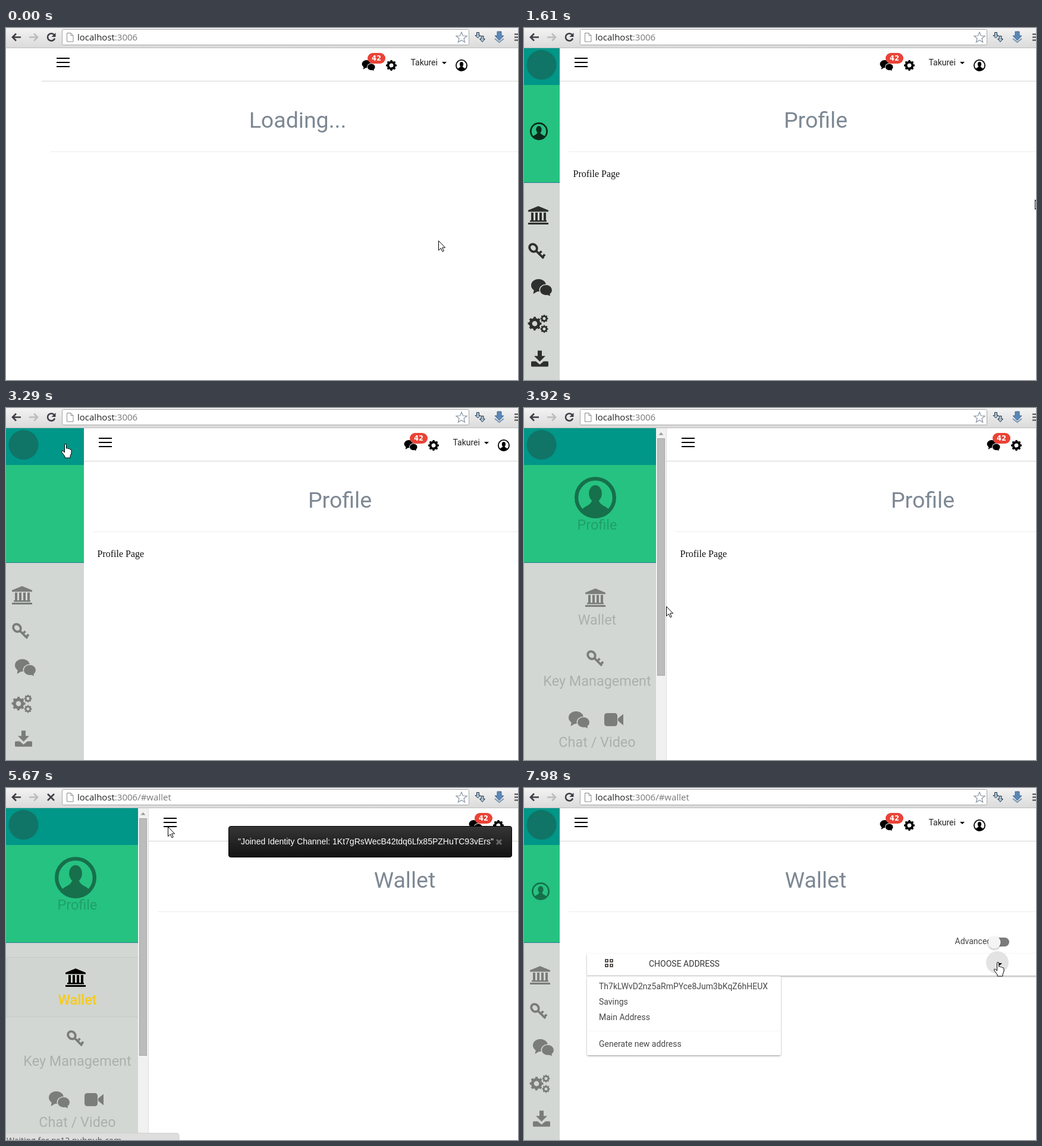
Animation, 861 px wide and 593 px high, one loop 8 s. Source, as an HTML page:

```html
<!DOCTYPE html>
<html lang="en">
<head>
<meta charset="utf-8">
<title>Wallet dashboard</title>
<style>
  html, body { margin: 0; width: 100%; height: 100%; overflow: hidden; background: #fff; }
  svg { display: block; width: 861px; height: 593px; }
  text { font-family: Roboto, sans-serif; font-size: 14px; white-space: pre; }
  .url { font-family: "Open Sans", sans-serif; font-size: 15px; }
  .heading { font-size: 37.5px; fill: #7d8894; text-anchor: middle; }
  .serif { font-family: "Liberation Serif", serif; font-size: 16px; fill: #111; }
  .label { font-size: 23.4px; text-anchor: middle; fill-opacity: .18; }
  .badge { font: bold 11.5px "DejaVu Sans", sans-serif; fill: #fff; text-anchor: middle; }
  .toast { font-family: "Liberation Sans", sans-serif; fill: #fff; }
  .line { fill: none; stroke: #403c46; stroke-width: 2.6; }
</style>
</head>
<body>
<svg id="stage" viewBox="0 0 861 593" xmlns="http://www.w3.org/2000/svg"></svg>
<script>
const LOOP = 8000, STEP = 70, CLOSED = 60, OPEN = 240;
const stage = document.getElementById('stage');

const gear = (x, y, r) => `
  <g fill="none" stroke="currentColor" transform="translate(${x} ${y}) rotate(-11)">
    <circle r="${r * .6}" stroke-width="${r * .44}"/>
    <circle r="${r * .87}" stroke-width="${r * .26}" pathLength="16" stroke-dasharray="1 1"/>
  </g>`;
const use = (id, x, y, scale = 1, attrs = '') =>
  `<use href="#${id}" transform="translate(${x} ${y}) scale(${scale})" ${attrs}/>`;
const text = (x, y, content, attrs = '') => `<text x="${x}" y="${y}" ${attrs}>${content}</text>`;

const defs = `<defs>
  <linearGradient id="chrome" x2="0" y2="1"><stop stop-color="#f3f3f3"/><stop offset="1" stop-color="#dadada"/></linearGradient>
  <linearGradient id="dark" x2="0" y2="1"><stop stop-color="#363636"/><stop offset="1" stop-color="#121212"/></linearGradient>
  <filter id="shadow" x="-10%" y="-20%" width="120%" height="150%">
    <feDropShadow dx="0" dy="1.5" stdDeviation="1.6" flood-opacity=".35"/>
  </filter>
  <mask id="gap" maskUnits="userSpaceOnUse" x="-2" y="-2" width="40" height="34">
    <path fill="#fff" d="M-2-2h40v34h-40z"/><ellipse cx="25" cy="18.5" rx="11.5" ry="10"/>
  </mask>
  <path id="bank" d="M17 0 34 7V9.500H0V7zM5 11h4v13H5zM12 11h4v13h-4zM19 11h4v13h-4zM26 11h4v13h-4zM3 24h28v2.500H3zM0 28h34v3H0z"/>
  <g id="key" fill="none" stroke="currentColor">
    <ellipse cx="8.500" cy="8.500" rx="6.800" ry="5.800" stroke-width="3.800" transform="rotate(45 8.500 8.500)"/>
    <path d="M12.500 12.500 26 26M18.500 18l4-4M24 24l4-4.500" stroke-width="3.800"/>
  </g>
  <g id="chat">
    <g mask="url(#gap)"><ellipse cx="12.500" cy="10.500" rx="12.500" ry="10.500"/><path d="M5 17 3.500 25 12 20z"/></g>
    <ellipse cx="25" cy="18.500" rx="10" ry="8.500"/><path d="M26 26l6 2.500-1-6z"/>
  </g>
  <g id="gears">${gear(11, 15, 11.5)}${gear(27, 6.500, 6.5)}${gear(27, 24, 6.5)}</g>
  <path id="download" d="M11 0h7v9h6l-9.500 9.500L5 9h6zM1.500 18H8l6.500 5.500L21 18h6.500q1.500 0 1.500 1.500v6q0 1.500-1.500 1.500h-26Q0 27 0 25.500v-6Q0 18 1.500 18z"/>
  <path id="video" d="M5 0h12q5 0 5 5v12q0 5-5 5H5q-5 0-5-5V5q0-5 5-5zM23 9l9-7.500v19L23 13z"/>
  <g id="user">
    <circle r="9.100" fill="none" stroke="currentColor" stroke-width="1.800"/>
    <ellipse cy="-2" rx="3.100" ry="4"/>
    <path d="M-6.500 5.800C-5 3.800-2.500 4-1.700 1.500h3.400C2.500 4 5 3.800 6.500 5.800A9 9 0 0 1-6.500 5.800z"/>
  </g>
  <path id="caret" d="M0 0h8L4 4z"/>
</defs>`;

const content = `<g id="content">
  <path d="M0 34h870v559H0z" fill="#fff"/>
  <path d="M0 89.500h870" stroke="#d4d4d4"/><path d="M15 208.500h870" stroke="#ececec"/>
  <path d="M25 51h22M25 58h22M25 65h22" stroke="#000" stroke-width="2"/>
  ${use('chat', 538.5, 54, .63)}
  <rect x="548" y="42" width="30" height="18" rx="9" fill="#ea4336"/>
  ${text(563, 55, '42', 'class="badge"')}
  ${gear(588, 63, 9)}
  ${text(620.5, 63, 'Takurei', 'fill="#222"')}
  ${use('caret', 673, 57)}
  ${use('user', 706, 63)}
  ${text(430.5, 168, '', 'id="heading" class="heading"')}
  ${text(22.5, 251, 'Profile Page', 'id="page" class="serif"')}
</g>`;

const wallet = `<g id="wallet">
  ${text(724.5, 263, 'Advanced', 'fill="#444"')}
  <rect x="782" y="252" width="34" height="15" rx="7.5" fill="#7b7b7b"/>
  <circle cx="791" cy="260" r="10.5" fill="#f4f4f4" filter="url(#shadow)"/>
  <rect id="button" x="106" y="279" width="780" height="37" rx="2" fill="#fff" filter="url(#shadow)"/>
  <path d="M137 289h4v4h-4zM145 289h4v4h-4zM137 297h4v4h-4zM145 297h4v4h-4z" fill="none" stroke="#332b28" stroke-width="1.600"/>
  ${text(210, 301, 'CHOOSE ADDRESS', 'fill="#333"')}
  <circle id="ripple" cx="796" cy="294" fill="#e3e3e3"/>
  ${use('caret', 796, 295)}
  <g id="dropdown">
    <rect x="106" y="317" width="326" height="133" rx="3" fill="#fff" filter="url(#shadow)"/>
    <g fill="#484848">
      ${text(126, 339, 'Th7kLWvD2nz5aRmPYce8Jum3bKqZ6hHEUX')}
      ${text(126, 365, 'Savings')}${text(126, 391, 'Main Address')}
      ${text(126, 436, 'Generate new address')}
    </g>
    <path d="M107 409.500h324" stroke="#f5f5f5"/>
  </g>
</g>`;

const sidebar = `<g id="sidebar">
  <g id="panel">
    <path d="M0 34h1v62H0z" fill="#009688"/><path d="M0 96h1v165H0z" fill="#26c281"/>
    <path d="M0 260h1v1H0z" fill="#287d93"/><path d="M0 261h1v332H0z" fill="#d2d7d3"/>
  </g>
  <circle cx="29.500" cy="62" r="25" fill="#107467"/>
  <g id="compact">
    ${use('user', 28, 174, 1.5, 'id="avatar"')}
    ${use('bank', 10, 300)}${use('key', 10, 362)}${use('chat', 15, 423)}
    ${use('gears', 10, 483)}${use('download', 15, 543.5)}
  </g>
  <g id="full">
    <rect id="selected" x="1.500" y="285.500" width="221" height="100" fill="#d0d5d1" stroke="#c6cbc7"/>
    <g opacity=".42">
      ${use('user', 117, 151, 3.5)}${use('key', 102, 408)}
      ${use('chat', 72, 511)}${use('video', 132, 514)}
    </g>
    ${use('bank', 100, 304, 1, 'id="bankIcon"')}
    <g class="label">
      ${text(120, 205, 'Profile', 'class="label"')}
      ${text(120, 365, 'Wallet', 'id="walletLabel" class="label"')}
      ${text(120, 468, 'Key Management', 'class="label"')}
      ${text(120, 571, 'Chat / Video', 'class="label"')}
    </g>
  </g>
  <g id="scrollbar">
    <path d="M222 34h18v559h-18z" fill="#f1f1f1"/><path d="M239.500 34v559" stroke="#dedede"/>
    <path d="M226.500 45.500h8l-4-4.500z" fill="#999"/>
    <rect x="224.500" y="51.500" width="12" height="399" fill="#bcbcbc" stroke="#a6a6a6"/>
  </g>
</g>`;

const overlays = `
  <g id="toast">
    <rect x="374.500" y="64.500" width="476" height="52" rx="3.500" fill="url(#dark)" stroke="#000"/>
    ${text(390, 95, '"Joined Identity Channel: 1Kt7gRsWecB42tdq6Lfx85PZHuTC93vErs"', 'class="toast"')}
    <path d="M825 87l8 8m0-8-8 8" stroke="#6a6a6a" stroke-width="3"/>
  </g>
  <g id="status">
    <path d="M-1 0H287q4 0 4 4V30H-1z" fill="#dedede" stroke="#cfcfcf"/>
    ${text(1, 17, 'Waiting for ps12.pubnub.com...', 'class="url" style="font-size:14px" fill="#555"')}
  </g>`;

const browser = `<g>
  <path d="M0 0h861v34H0z" fill="url(#chrome)"/><path d="M0 33.500h861" stroke="#bdbdbd"/>
  <rect x="94.500" y="2.500" width="684" height="26" rx="2" fill="#fff" stroke="#a8a8a8"/>
  <path class="line" d="M25 15.500H11M17 9.500l-6 6 6 6"/>
  <path class="line" d="M39 15.500h14M47 9.500l6 6-6 6" style="stroke:#bcbcbc"/>
  <g id="reload"><path class="line" d="M81 11.500A6.200 6.200 0 1 0 82 17.500"/><path d="M83.500 8v7h-7z" fill="#403c46"/></g>
  <path id="stop" class="line" d="M70 10l11 11m0-11L70 21"/>
  <path d="M102.500 8.500h6.500l4 4v10.500h-10.500zM109 8.500v4h4" fill="#fff" stroke="#8b8b8b"/>
  <text class="url" x="120" y="21" fill="#777"><tspan fill="#222">localhost</tspan>:3006<tspan id="route"></tspan></text>
  <path d="M766 7l2.500 6 6.500.500-5 4.200 1.600 6.300-5.600-3.500-5.600 3.500 1.600-6.300-5-4.200 6.500-.500z" fill="#fff" stroke="#8792a3" stroke-width="1.200"/>
  <path d="M791.500 7.500h4v5h2.500l-4.500 4.500-4.500-4.500h2.500zM799 13.500h4v5h2.500L801 23.500l-4.500-5h2.500z" fill="#a4c3da" stroke="#27313c"/>
  <path d="M826 6h7v7h4l-7.500 8-7.500-8h4z" fill="#5b87b6" stroke="#3f6896"/>
  <path d="M822 18l7.500 6 7.500-6" fill="none" stroke="#7895b5" stroke-width="2"/>
  <path d="M855 10.500h8M855 15.500h8M855 20.500h8" stroke="#46434a" stroke-width="2"/>
</g>`;

const cursors = `<g id="cursor" stroke="#000" fill="#fff">
  <path id="arrow" d="M.500.500v16l3.700-3.500 2.800 5.700 2.300-1.100-2.700-5.600h5z"/>
  <path id="hand" stroke-linejoin="round" d="M-1.500 14V2q0-1.500 1.500-1.500T1.500 2v6q2.500-1 3 .700 2.300-.700 2.800.900 2.700-.400 2.700 1.900v4.500L8 21v3H-1v-2.500L-6.500 14q-.500-2 1.500-2 1.500.500 3.500 3z"/>
</g>`;

stage.innerHTML = defs + content + wallet + sidebar + overlays + browser + cursors;
const ui = Object.fromEntries([...stage.querySelectorAll('[id]')].map(el => [el.id, el]));

// Cursor tip: time, x, y
const path = [
  [0, 727, 358], [420, 727, 358], [560, 740, 389], [630, 775, 370], [770, 859, 289],
  [1820, 859, 289], [2240, 450, 230], [2660, 10, 29], [2730, 3, 6], [3010, 100, 60],
  [3430, 100, 60], [3640, 503, 390], [3850, 302, 340], [4060, 112, 323], [5110, 112, 323],
  [5600, 272, 65], [5880, 272, 65], [6300, 420, 170], [6580, 776, 443], [6790, 776, 443],
  [7070, 695, 423], [7280, 649, 421], [7490, 735, 370], [7560, 797, 293], [8000, 797, 293]
];

const progress = (t, start, end) => Math.min(1, Math.max(0, (t - start) / (end - start)));
const easeOut = k => 1 - (1 - k) ** 2;
const mix = (a, b, k) => a + (b - a) * k;
const within = (t, start, end) => t >= start && t < end;
const show = (el, on) => el.setAttribute('visibility', on ? 'visible' : 'hidden');
const fade = (el, value) => { el.setAttribute('opacity', value); show(el, value > 0); };
const move = (el, x, y) => el.setAttribute('transform', `translate(${x} ${y})`);

function placeCursor(t) {
  const i = path.findIndex(point => point[0] > t);
  const [a, b] = [path[i - 1], path[i]];
  const k = progress(t, a[0], b[0]);
  const hand = within(t, 3010, 3500) || within(t, 4060, 5180) || t >= 7560;
  move(ui.cursor, Math.round(mix(a[1], b[1], k)), Math.round(mix(a[2], b[2], k)));
  show(ui.hand, hand);
  show(ui.arrow, !hand);
}

function render(time) {
  const t = Math.floor(time / STEP) * STEP;
  const onWallet = t >= 4970;
  const opened = easeOut(progress(t, 3212, 3562)) - easeOut(progress(t, 5790, 6140));
  const width = Math.round(mix(CLOSED, OPEN, opened));

  move(ui.content, width, 0);
  ui.heading.textContent = t < 210 ? 'Loading...' : onWallet ? 'Wallet' : 'Profile';
  show(ui.page, t >= 210 && !onWallet);

  const slide = easeOut(progress(t, 1015, 1400));
  show(ui.sidebar, t >= 1050);
  move(ui.sidebar, Math.round(CLOSED * (slide - 1)), 0);
  ui.panel.setAttribute('transform', `scale(${width} 1)`);

  const settle = t < 5000 ? progress(t, 1890, 2240) : progress(t, 6300, 6580);
  fade(ui.compact, within(t, 3430, 5950) || t < 1050 ? 0 : mix(.78, .42, settle));
  move(ui.compact, t < 5000 ? Math.round(3 * settle - 3) : 0, 0);
  ui.avatar.setAttribute('opacity', t < 3220 ? 1 : progress(t, 6300, 6580));

  fade(ui.full, t < 5810 ? progress(t, 3430, 3850) : 0);
  move(ui.full, onWallet ? 0 : 3, 0);
  ui.selected.setAttribute('opacity', onWallet ? 1 : 0);
  ui.bankIcon.setAttribute('opacity', t < 4060 ? .42 : 1);
  ui.walletLabel.style.cssText = t < 4060 ? '' :
    `fill:${onWallet ? '#f7ca18' : '#fff'};fill-opacity:1;font-weight:500`;
  show(ui.scrollbar, within(t, 3560, 5810));

  fade(ui.wallet, progress(t, 6300, 6510));
  fade(ui.button, t >= 7560 ? 1 : 0);
  ui.ripple.setAttribute('r', 19 * easeOut(progress(t, 7560, 7770)));
  fade(ui.dropdown, progress(t, 7630, 7910));

  fade(ui.toast, progress(t, 4550, 4830) - progress(t, 6790, 7210));
  show(ui.status, within(t, 5600, 5810));
  move(ui.status, 0, t < 5670 ? 587.5 : 581.5);

  const busy = within(t, 210, 280) || within(t, 4970, 5880);
  show(ui.stop, busy);
  show(ui.reload, !busy);
  ui.route.textContent = onWallet ? '/#wallet' : '';
  placeCursor(t);
}

const begin = performance.now();
function tick(now) {
  render(Math.max(0, now - begin) % LOOP);
  requestAnimationFrame(tick);
}
render(0);
requestAnimationFrame(tick);
</script>
</body>
</html>
```
